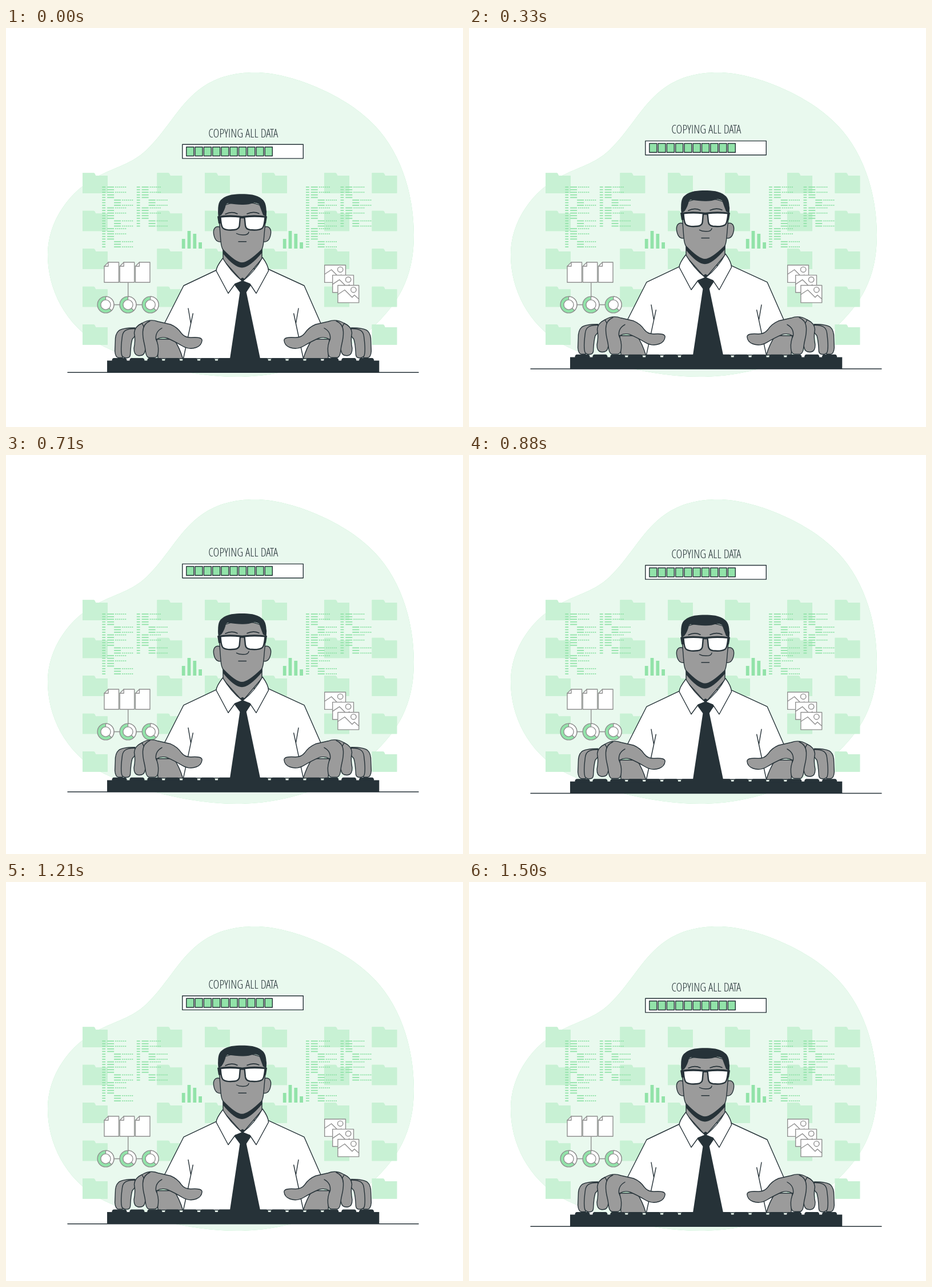
Recreate the animation shown at these times as an HTML page with a canvas. Size 800x700 px, loop 1.54 s.

```html
<!DOCTYPE html>
<html lang="en">
<head>
<meta charset="utf-8">
<title>Copying all data</title>
<style>
  html, body { margin: 0; width: 100%; height: 100%; overflow: hidden; background: #fff; }
  canvas { display: block; }
</style>
</head>
<body>
<canvas id="stage" width="800" height="700"></canvas>
<script>
const ctx = document.getElementById('stage').getContext('2d');
const GREEN = '#92e3a9', DARK = '#263238', SKIN = '#9b9b9b', GRAY = '#8f8f8f', WHITE = '#fff';
const LOOP = 1540, FPS = 24, FRAMES = 37, RISE = 14, PHASE = 0.6;

function shape(d, fill, stroke, width = 1.4) {
  const path = new Path2D(d);
  if (fill) { ctx.fillStyle = fill; ctx.fill(path); }
  if (stroke) { ctx.strokeStyle = stroke; ctx.lineWidth = width; ctx.stroke(path); }
}

function box(x, y, w, h, fill, stroke) {
  shape(`M${x} ${y}h${w}v${h}h${-w}z`, fill, stroke);
}

function disc(x, y, r, fill, stroke) {
  shape(`M${x - r} ${y}a${r} ${r} 0 1 1 ${2 * r} 0a${r} ${r} 0 1 1 ${-2 * r} 0z`, fill, stroke);
}

// Green washed out with a translucent white layer on top.
function tint(d, white) {
  shape(d, GREEN);
  shape(d, `rgba(255,255,255,${white})`);
}

function mirrored(axis, draw) {
  draw();
  ctx.save();
  ctx.translate(2 * axis, 0);
  ctx.scale(-1, 1);
  draw();
  ctx.restore();
}

function blob() {
  tint(`M436 78C500 78 590 118 634 160C690 210 714 290 714 363C714 440 685 485 640 527
    C590 575 500 612 404 612C320 612 220 585 160 553C105 520 73 460 73 398
    C73 340 110 285 165 258C200 241 225 236 250 210C285 175 305 130 345 103
    C370 86 400 78 436 78Z`, 0.8);
}

function folders() {
  for (const x of [134, 264.5, 348, 448.3, 557.2, 640.6]) {
    for (let row = 0; row < 5; row++) {
      tint(`M${x} ${254.3 + row * 66.5}h19.5q2 0 2.6 2.6t2.6 2.2h19v30.7h-43.7z`, 0.5);
    }
  }
}

function codeColumn(x, rows) {
  ctx.fillStyle = GREEN;
  for (let i = 0; i < rows; i++) {
    const y = 278.2 + i * 4.56, step = i % 8, indent = step > 4 ? 12 : 0;
    ctx.fillRect(x, y, 5.8, 1.8);
    ctx.fillRect(x + 8.8 + indent, y, 12, 1.8);
    if ([0, 2, 5, 7].includes(step)) {
      for (let dot = 0; dot < 6; dot++) {
        ctx.fillRect(x + 22.8 + indent + dot * 3.4, y, 2.2, 1.8);
      }
    }
  }
}

function barChart(x) {
  [17, 31, 26, 11].forEach((h, i) => box(x + i * 9.8, 387 - h, 5.8, h, GREEN));
}

function documents() {
  shape('M213.7 446V471M174 485.5H252', null, GRAY);
  for (const x of [172, 199.2, 226.5]) {
    shape(`M${x + 7} 411h18.5v35.3h-25.5v-28.3z`, WHITE, GRAY);
    shape(`M${x + 7} 411v7h-7`, null, GRAY);
  }
  for (const x of [174.5, 213.5, 252.7]) {
    disc(x, 485.5, 14.4, GREEN, GRAY);
    ctx.beginPath();
    ctx.moveTo(x, 485.5);
    ctx.arc(x, 485.5, 14.4, -Math.PI / 2, Math.PI / 4);
    ctx.closePath();
    ctx.fillStyle = WHITE;
    ctx.fill();
    ctx.stroke();
    disc(x, 485.5, 8.6, WHITE, GRAY);
  }
}

function pictures() {
  for (const [x, y] of [[557.7, 416], [571.7, 433.6], [580.9, 451.5]]) {
    box(x, y, 36.8, 30.4, WHITE, GRAY);
    shape(`M${x} ${y + 16}l12-8 13 13 4-4 7.8 7`, null, GRAY);
    disc(x + 27.5, y + 7.8, 4.7, WHITE, GRAY);
  }
}

// Picks the narrowest light face and the largest size that fits the caption.
function captionFont(text, width, size) {
  const faces = ['"Noto Sans"', '"Open Sans"', 'Roboto', '"Liberation Sans Narrow"'];
  const best = faces.map(face => {
    const font = px => `300 extra-condensed ${px}px ${face}, sans-serif`;
    ctx.font = font(size);
    return { font, width: ctx.measureText(text).width };
  }).sort((a, b) => a.width - b.width)[0];
  const px = Math.min(size, size * width / best.width);
  return { font: best.font(px), px };
}

const CAPTION = 'COPYING ALL DATA';
const caption = captionFont(CAPTION, 122, 21.5);

function progress() {
  ctx.font = caption.font;
  ctx.textAlign = 'center';
  ctx.fillStyle = DARK;
  ctx.fillText(CAPTION, 415.2, 184.2 + caption.px * 0.357);
  box(308.8, 204.3, 211.5, 24.6, WHITE, DARK);
  for (let i = 0; i < 10; i++) box(315.8 + i * 15.28, 208.7, 13, 15.8, GREEN, DARK);
}

function torso() {
  shape('M370 424L311 452L274 525L309 580H522L554 525L522 452L457 422Z', WHITE, DARK);
  mirrored(415.5, () => shape('M319 492L323.6 518.5M327.3 501L310.5 580', null, DARK));
  shape('M380 386H448V405L414 445L380 407Z', SKIN, DARK);
  shape('M410 460H420L445 580H392Z', DARK);
  shape('M400 451L405 443L414 438L423 443L429 451L420.5 464H409.5Z', DARK);
  shape('M379.5 404Q368 419 368 426L389 465.5L401 449L413.5 444Q393 427 379.5 404Z', WHITE, DARK);
  shape('M449 402.5Q459.5 417 459.5 426L438 465.5L427 449L414.5 444Q436 427 449 402.5Z', WHITE, DARK);
}

function head() {
  mirrored(413.5, () => shape('M375 349.5C366 346 362.5 353 363.5 361C365 371 369 376 376.5 375', SKIN, DARK));
  shape('M379.5 386L380 396Q400 420.5 413 420.5T448.5 394V386Z', DARK);
  shape(`M372 322L376 374Q377 385 380 389Q402 412 413 412T447.5 389Q450 385 451 374L455.5 322
    C452 300 376 300 372 322Z`, SKIN, DARK);
  shape(`M371.8 331C370.5 315 371 305 378 300C387 292 402 291.3 413 291.3S439 292 448 300
    C455 305 456.5 315 455.5 331L450 328Q447 320 443 309Q438 306 434 306.5
    Q424 310.5 413 310T388 307.5L385 309.5Q383 320 377 328Z`, DARK);
  shape('M384 326.5Q395 321 405 326M422 326Q433 321 443 325.5', null, DARK, 1.6);
  shape('M370 330.5Q390 326.5 413.5 330Q437 326.5 457 330.5L455 343H451V334H376V343H372Z', DARK);
  shape('M375.5 331.5Q393 329.5 410 331.5L408.7 346.5Q408 353 400 354Q387 355.5 381 352Q376.5 350 375.5 331.5Z', WHITE, DARK, 2.4);
  shape('M417.5 331.5Q435 329.5 453.5 331.5Q452 350 447.5 352Q441 355.5 427 354Q420 353 419 346.5Z', WHITE, DARK, 2.4);
  shape('M403.5 360.5Q408 363 414 363Q424 363.5 425 358M407 374.7H420.5', null, DARK);
}

function hand() {
  shape('M264 546L294 546Q304 561 309.5 580H266Z', SKIN, DARK);
  shape('M226 526Q203 526 197 531.5Q191 537 191.3 550L190.6 567Q191.5 578 197 578.5H204L216 540Z', SKIN, DARK);
  shape('M226 527.5C210 527 204.5 532 203.5 541C202 553 200 566 203 575Q206 579.5 213 578.5Q218 578 217.8 570Q218.5 555 221 546L226 540Z', SKIN, DARK);
  shape(`M225 534Q227 523 238 518Q252 509.5 266 515L288 520Q300 525 307 535.5Q313 543.5 324 543
    Q343 541.5 343.2 548Q342.5 557 333 560.5Q321 565 309 558Q294 549 282 544Q272 541 264 546L240 548Z`, SKIN, DARK);
  shape('M238 518Q225 524 224.5 535Q227 547 224 562Q224 573.5 231 574.5Q241 576 243 568L250 540Z', SKIN, DARK);
  const index = `M252 514Q240 519 239.5 533C239 548 243 553 244 565Q245 577 250 578.3H260Q266 578 266.5 568
    Q267.5 556 262.5 546Q261 533 273 526.5`;
  shape(index + 'L270 517Z', SKIN);
  shape(index, null, DARK);
}

function keyboard() {
  shape('M108 604.3H722', null, DARK, 1.5);
  box(177, 583.6, 476.3, 20.8, DARK);
  for (let i = 0; i < 15; i++) {
    if (i > 6 && i < 9) continue;
    const w = i === 6 ? 88 : 26;
    shape(`M${185.5 + i * 30.9} 585v-3q1-3 3-3h${w - 6}q2 0 3 3v3z`, DARK);
  }
}

// Straight up and straight back down, in 24 steps a second.
function lift(ms) {
  const step = Math.floor((ms % LOOP + 4.9) * FPS / 1000) % FRAMES;
  const height = s => RISE * (1 - Math.abs(2 * s / (FRAMES - 1) - 1));
  return height(PHASE) - height((step + PHASE) % (FRAMES - 1));
}

function draw() {
  ctx.fillStyle = WHITE;
  ctx.fillRect(0, 0, 800, 700);
  ctx.lineJoin = ctx.lineCap = 'round';

  blob();
  folders();
  for (const x of [168.3, 525]) {
    codeColumn(x, 24);
    codeColumn(x + 60.5, 16);
  }
  barChart(307.8);
  barChart(484.8);
  documents();
  pictures();

  ctx.save();
  ctx.translate(0, lift(performance.now()));
  progress();
  torso();
  head();
  mirrored(415, hand);
  keyboard();
  ctx.restore();
  requestAnimationFrame(draw);
}

draw();
</script>
</body>
</html>
```
